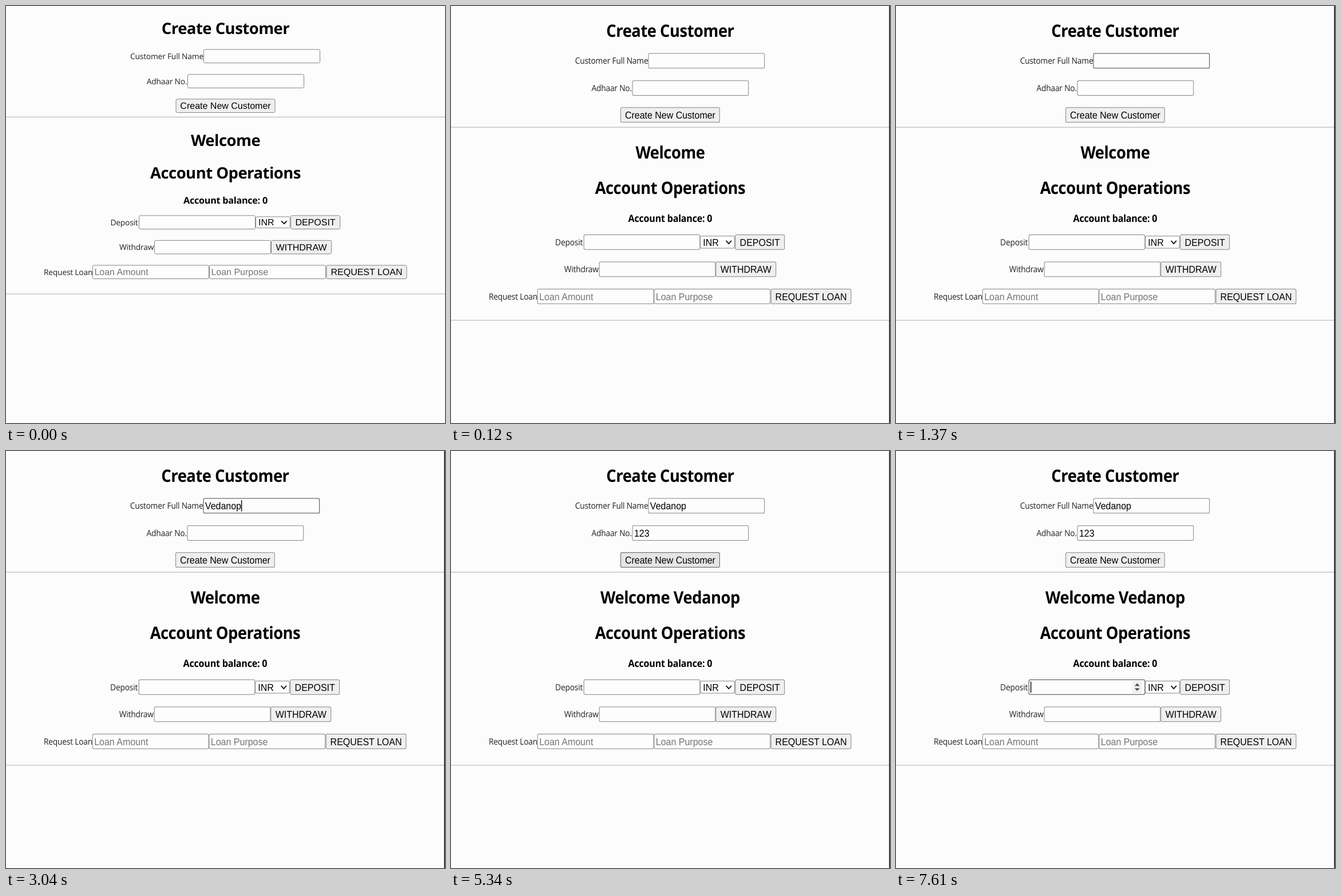
An HTML page that plays this animation: 767x730 px, repeating every 8 s.

```html
<!DOCTYPE html>
<html lang="en">
<head>
<meta charset="utf-8">
<title>Account form</title>
<style>
  html, body { margin: 0; width: 100%; height: 100%; overflow: hidden; background: #fcfcfc; }
  svg { display: block; width: 767px; height: 730px; }
  text { white-space: pre; text-rendering: geometricPrecision; }
  .head, .sub, .label { font-family: "Open Sans", "Noto Sans", sans-serif; }
  .head { font-size: 27.4px; font-weight: 700; letter-spacing: -.48px; text-anchor: middle; }
  .sub { font-size: 16.1px; font-weight: 700; letter-spacing: -.22px; text-anchor: middle; }
  .label { font-size: 13.8px; letter-spacing: -.2px; fill: #222; }
  .ui { font: 16px "Liberation Sans", Arial, sans-serif; }
  .mid { text-anchor: middle; }
  .hint { fill: #757575; }
</style>
</head>
<body>
<svg id="stage" viewBox="0 0 767 730"></svg>
<script>
const LOOP = 8000, BLINK = 550, NAME = "Vedanop", ID = "123";
const NAME_KEYS = [1990, 2520, 2570, 2620, 2790, 2970, 3040];
const ID_KEYS = [4290, 4470, 4710];
const BORDER = "#85858c", FOCUS = "#484848";

const stage = document.getElementById("stage");

function add(parent, tag, attrs, text) {
  const el = document.createElementNS("http://www.w3.org/2000/svg", tag);
  set(el, attrs);
  if (text) el.textContent = text;
  parent.appendChild(el);
  return el;
}
function set(el, attrs) {
  for (const k in attrs) el.setAttribute(k, attrs[k]);
}
function show(el, on) {
  el.setAttribute("visibility", on ? "visible" : "hidden");
}

add(stage, "rect", { width: 767, height: 730, fill: "#fcfcfc" });
const page = add(stage, "g", {});
const edge = add(stage, "rect", { x: 765.5, width: 1.5, height: 730, fill: "#111" });

const write = (cls, x, y, s, parent = page) => add(parent, "text", { class: cls, x, y }, s);

function box(x, cy, w, h, fill) {
  return add(page, "rect", {
    x: x + .5, y: cy - h / 2 + .5, width: w - 1, height: h - 1,
    rx: 2.2, fill, stroke: BORDER, "stroke-width": 1
  });
}

function button(x, cy, w, s) {
  const frame = box(x, cy, w, 24.6, "#efefef");
  write("ui mid", x + w / 2, cy + 5.7, s);
  return frame;
}

function field(x, cy, hint) {
  const frame = box(x, cy, 204, 24.6, "#fdfdfd");
  const text = write(hint ? "ui hint" : "ui", x + 3.4, cy + 5.7, hint || "");
  const caret = add(page, "rect", { y: cy - 9, width: 1.4, height: 18, fill: "#000" });
  const spin = add(page, "g", { transform: `translate(${x + 190} ${cy})` });
  add(spin, "rect", { x: -8, y: -10, width: 16, height: 20, fill: "#f0f0f0" });
  add(spin, "path", { d: "M-4.5-1.8L0-6.2L4.5-1.8ZM-4.5 1.8L0 6.2L4.5 1.8Z", fill: "#505050" });
  show(caret, false);
  show(spin, false);
  return { x, frame, text, caret, spin };
}

function update(f, value, focused, blinkOn, spinning) {
  f.text.textContent = value;
  f.frame.setAttribute("stroke", focused ? FOCUS : BORDER);
  const w = value ? f.text.getComputedTextLength() : 0;
  f.caret.setAttribute("x", f.x + 3.3 + w);
  show(f.caret, blinkOn);
  show(f.spin, spinning);
}

// Customer form
write("head", 383.5, 49.3, "Create Customer");
write("label", 217, 92.8, "Customer Full Name");
const nameField = field(345, 87.9);
write("label", 245.8, 136.6, "Adhaar No.");
const idField = field(317, 131.6);
const create = button(296.5, 174.7, 174, "Create New Customer");

// Account panel
const mark = add(page, "rect", { y: 214.4, height: 37.6, fill: "#3166d2" });
const welcome = write("head", 383.5, 244.6, "");
const parts = ["#000", "#fff", "#000"].map(fill => add(welcome, "tspan", { fill }));
write("head", 383.5, 301.7, "Account Operations");
write("sub", 383.5, 346.2, "Account balance: 0");

write("label", 182.4, 383.7, "Deposit");
const deposit = field(232, 378.7);
box(436, 378.7, 60.5, 20.5, "#fff");
write("ui", 441, 384.4, "INR");
add(page, "path", {
  d: "M481.3 376.4L486 381.2L490.7 376.4", fill: "none", stroke: "#111", "stroke-width": 1.8
});
button(497, 378.7, 87, "DEPOSIT");

write("label", 198, 427.2, "Withdraw");
field(259, 422.2);
button(463, 422.2, 106, "WITHDRAW");

write("label", 66, 470.7, "Request Loan");
field(151, 465.7, "Loan Amount");
field(355, 465.7, "Loan Purpose");
button(559.5, 465.7, 141, "REQUEST LOAN");

const rules = [194.4, 504].map(y => add(page, "rect", { y: y - .5, width: 768, height: 1 }));

const typed = (s, keys, t) => s.slice(0, keys.filter(k => k <= t).length);
const within = (t, a, b) => t >= a && t < b;

// The caret restarts its blink at every focus or key press
function blink(t, events, end) {
  const past = events.filter(k => k <= t);
  if (!past.length || t >= end) return false;
  return Math.floor((t - past[past.length - 1]) / BLINK) % 2 === 0;
}

function drawWelcome(t) {
  const s = t >= 5320 ? "Welcome " + NAME : "Welcome";
  const from = 9;
  const to = !within(t, 6510, 6880) ? from : t < 6530 ? 12 : t < 6610 ? 13 : 14;
  parts[0].textContent = s.slice(0, from);
  parts[1].textContent = s.slice(from, to);
  parts[2].textContent = s.slice(to);
  show(mark, to > from);
  if (to > from) {
    const x = welcome.getStartPositionOfChar(from).x;
    set(mark, { x, width: welcome.getEndPositionOfChar(to - 1).x - x });
  }
}

function render(t) {
  const tall = t >= 50;
  page.setAttribute("transform", tall ? "matrix(.9985 0 0 1.0915 0 0)" : "");
  show(edge, tall);
  for (const r of rules) r.setAttribute("fill", tall ? "#b2b0c4" : "#adadad");

  update(nameField, typed(NAME, NAME_KEYS, t), within(t, 1370, 3940),
    blink(t, [1620, ...NAME_KEYS], 3940), false);
  const idFocus = within(t, 3940, 5240);
  update(idField, typed(ID, ID_KEYS, t), idFocus, blink(t, [3940, ...ID_KEYS], 5240), idFocus);
  update(deposit, "", t >= 7510, blink(t, [7510], LOOP), t >= 7330);

  const hover = within(t, 4900, 5800);
  set(create, {
    fill: within(t, 5240, 5320) ? "#f5f5f5" : hover ? "#e5e5e5" : "#efefef",
    stroke: hover ? "#5a5a5a" : BORDER
  });
  drawWelcome(t);
}

const start = performance.now();
function tick() {
  render((performance.now() - start) % LOOP);
  requestAnimationFrame(tick);
}
render(0);
requestAnimationFrame(tick);
</script>
</body>
</html>
```
